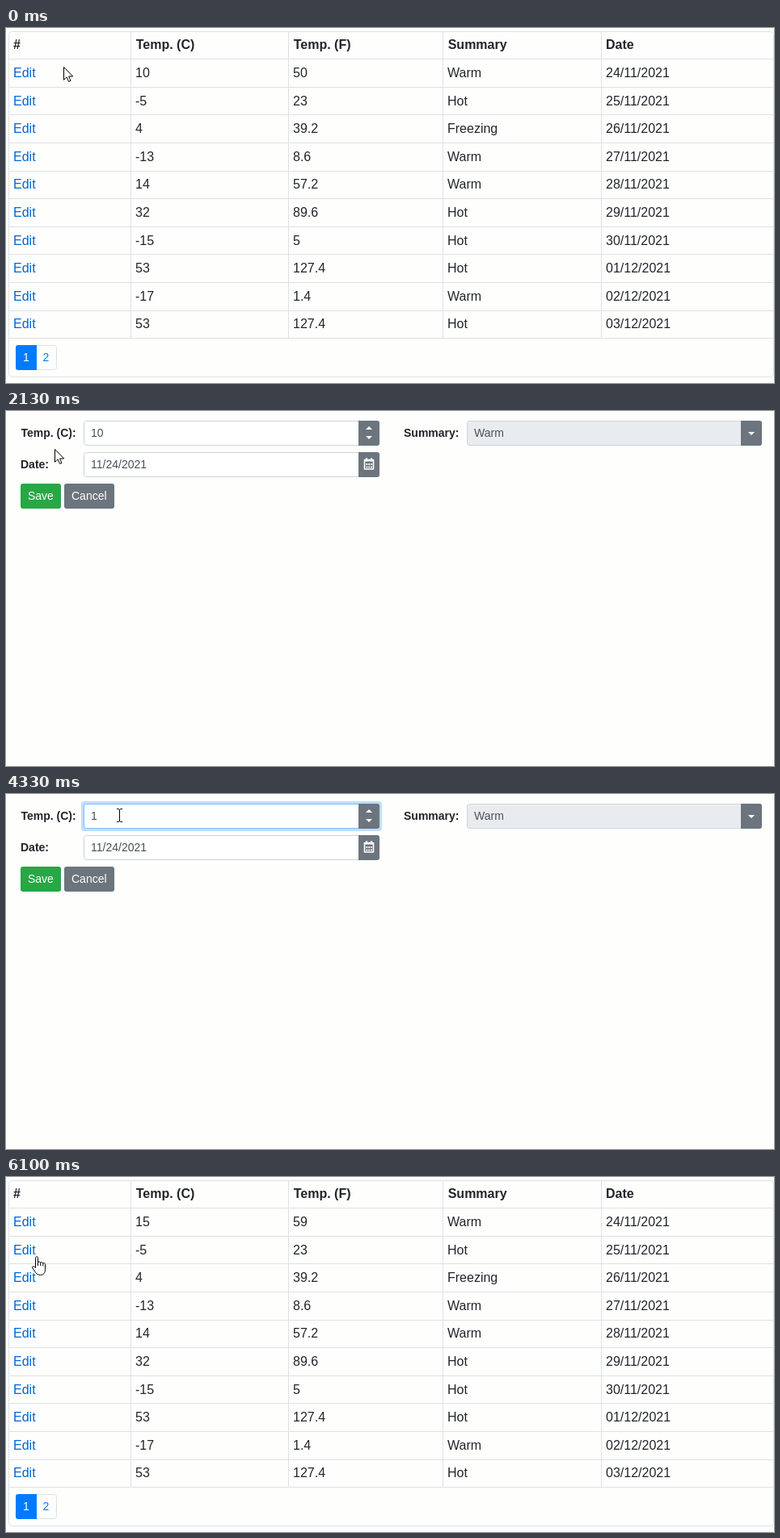
An HTML page that plays this animation: 950 by 440 pixels, repeating every 7630 ms.

```html
<!DOCTYPE html>
<html lang="en">
<head>
<meta charset="utf-8">
<title>Editable table</title>
<style>
  html, body { margin: 0; width: 100%; height: 100%; overflow: hidden; background: #fefefd; }
  svg { display: block; width: 100%; height: 100%; }
  text { font: 16px "Liberation Sans", Arial, sans-serif; fill: #212529; white-space: pre; }
  .bold { font-weight: 700; }
  .small { font-size: 14px; }
  .link { fill: #0366d6; }
  .link.over { fill: #0056b3; text-decoration: underline; }
  .value { fill: #495057; }
  .white { fill: #fff; }
</style>
</head>
<body>
<svg id="stage" viewBox="0 0 950 440" xmlns="http://www.w3.org/2000/svg"></svg>
<script>
const NS = 'http://www.w3.org/2000/svg';
const LOOP = 7630;
const GRID = '#dee2e6', GRAY = '#6c757d', FIELD = '#ced4da';
const stage = document.getElementById('stage');

function add(parent, tag, attrs = {}, content) {
  const el = document.createElementNS(NS, tag);
  for (const key in attrs) el.setAttribute(key, attrs[key]);
  if (content !== undefined) el.textContent = content;
  parent.appendChild(el);
  return el;
}
const group = parent => add(parent, 'g');
const label = (parent, x, y, str, cls = '') => add(parent, 'text', { x, y, class: cls }, str);
const path = (parent, d, attrs) => add(parent, 'path', { d, fill: 'none', ...attrs });
const box = (parent, x, y, width, height, attrs) =>
  add(parent, 'rect', { x, y, width, height, ...attrs });
const set = (el, attrs) => { for (const key in attrs) el.setAttribute(key, attrs[key]); };
const show = (el, on) => el.setAttribute('visibility', on ? 'visible' : 'hidden');

// Table
const table = group(stage);
const columns = [9, 160, 355, 546, 742];
const rows = [
  [10, 50, 'Warm'], [-5, 23, 'Hot'], [4, 39.2, 'Freezing'], [-13, 8.6, 'Warm'],
  [14, 57.2, 'Warm'], [32, 89.6, 'Hot'], [-15, 5, 'Hot'], [53, 127.4, 'Hot'],
  [-17, 1.4, 'Warm'], [53, 127.4, 'Hot']
];
box(table, 3.5, 4.5, 946, 428, { rx: 4, fill: 'none', stroke: GRID });
let grid = '';
for (let i = 0; i <= rows.length; i++) grid += `M4 ${Math.round(38.2 + 34.6 * i) + 0.5}H949`;
for (const x of [154.5, 349.5, 540.5, 736.5]) grid += `M${x} 5V384`;
path(table, grid, { stroke: GRID });
['#', 'Temp. (C)', 'Temp. (F)', 'Summary', 'Date'].forEach((str, i) =>
  label(table, columns[i] + (i && i < 4 ? 0.7 : 0), 26, str, 'bold'));

const cells = rows.map((row, i) => {
  const date = new Date(Date.UTC(2021, 10, 24 + i)).toISOString().slice(0, 10);
  const values = ['Edit', ...row, date.split('-').reverse().join('/')];
  const y = Math.round(61 + 34.6 * i);
  return values.map((v, c) => label(table, columns[c], y, v, c ? '' : 'link'));
});

path(table, 'M38 393.5H59.5a3 3 0 0 1 3 3V420.5a3 3 0 0 1 -3 3H38', { stroke: GRID });
path(table, 'M38 393H15a3 3 0 0 0 -3 3V421a3 3 0 0 0 3 3H38Z', { fill: '#007bff' });
label(table, 21, 413, '1', 'small white');
label(table, 45.5, 413, '2', 'small').style.fill = '#007bff';

// Edit form
const form = group(stage);
const glow = box(form, 96, 12, 366, 31, { rx: 4, fill: '#007bff' });

function field(x, y, w, fill) {
  const frame = box(form, x + 0.5, y + 0.5, w - 1, 30, { rx: 3, fill, stroke: FIELD });
  const r = x + w, l = r - 26;
  path(form, `M${l} ${y}H${r - 3}a3 3 0 0 1 3 3V${y + 28}a3 3 0 0 1 -3 3H${l}Z`, { fill: GRAY });
  return frame;
}
const tempFrame = field(96, 12, 366, '#fff');
field(96, 51, 366, '#fff');
field(570, 12, 365, '#e9ecef');
path(form, 'M445 23L449 19L453 23ZM445 31H453L449 35ZM918 26H926L922 30Z', { fill: '#fff' });

const icon = group(form);
path(icon, 'M443.5 60.5H454.5V72H443.5Z', { stroke: '#fff', 'stroke-width': 1.6, 'stroke-linejoin': 'round' });
path(icon, 'M443 61.5H455M446 58V61M452 58V61', { stroke: '#fff', 'stroke-width': 2 });
path(icon, 'M445.5 66H453M445.5 69.5H453', { stroke: '#fff', 'stroke-width': 1.8, 'stroke-dasharray': '1.8 1' });

label(form, 18.5, 32, 'Temp. (C):', 'small bold');
label(form, 18, 71, 'Date:', 'small bold');
label(form, 492, 32, 'Summary:', 'small bold');
const temp = label(form, 105, 32, '10', 'small value');
label(form, 105, 71, '11/24/2021', 'small value');
label(form, 579, 32, 'Warm', 'small value');
const caret = box(form, 120, 20, 1, 14, { fill: '#212529' });

const ring = box(form, 18, 90, 50, 31, { rx: 4, fill: '#48b461' });
const save = box(form, 18, 90, 50, 31, { rx: 3 });
box(form, 72, 90, 62, 31, { rx: 3, fill: GRAY });
label(form, 27, 110, 'Save', 'small white');
label(form, 81, 110, 'Cancel', 'small white');

// Pointers, each with its hot spot at 0,0
const ink = { stroke: '#000', 'stroke-linejoin': 'round' };
const pointers = { arrow: group(stage), hand: group(stage), beam: group(stage) };
path(pointers.arrow, 'M.5 .5V16.3L4.1 12.9L6.6 18.4L9 17.4L6.6 12H11.7Z', { ...ink, fill: '#fff' });
path(pointers.hand,
  'M-1.5 13.5V1.5C-1.5 -.9 1.5 -.9 1.5 1.5V6.8C2 5.4 4.5 5.6 4.7 7.4C5.3 6.2 7.6 6.5 7.8 8.3' +
  'C8.5 7.3 10.5 7.6 10.5 9.6V15.5C10.5 19.5 8.6 22.5 4.5 22.5C.8 22.5 -.8 20.5 -2.3 18' +
  'L-5.2 14C-6.2 12 -4 11 -2.6 12.4ZM1.5 6.8V11M4.7 7.4V11M7.8 8.3V11.5',
  { ...ink, fill: '#fff' });
path(pointers.beam, 'M-3 -7.5H-1L.5 -6.5L2 -7.5H4M.5 -6.5V7M-3 8.5H-1L.5 7.5L2 8.5H4M.5 7V8', ink);

const clamp = v => Math.min(1, Math.max(0, v));
const ramp = (t, from, span) => {
  const u = clamp((t - from) / span);
  return u * u * (3 - 2 * u);
};
const mix = (a, b, p) => `rgb(${a.map((v, i) => Math.round(v + (b[i] - v) * p))})`;

// start, duration, from, to, bend of the path
const moves = [
  [345, 715, [71, 48], [30, 55], [0, 10]],
  [1905, 655, [30, 55], [140, 26], [0, 0]],
  [4980, 580, [140, 26], [38, 99], [10, 4]]
];
function pointerAt(t) {
  const [start, span, a, b, bend] = moves.filter(m => t >= m[0]).pop() || moves[0];
  const s = ramp(t, start, span);
  return a.map((v, i) => v + (b[i] - v) * s + 2 * s * (1 - s) * bend[i]);
}

const OPEN = 1730, FORM = 1760, LEAVE = 6070, DONE = 6100;
const inside = ([x, y], l, top, r, bottom) => x >= l && x <= r && y >= top && y <= bottom;
const within = (t, a, b) => t >= a && t < b;

function pointerKind(t, p) {
  if (t < FORM) return inside(p, 9, 48, 37, 66) ? 'hand' : 'arrow';
  if (t < 1930 || t >= LEAVE) return 'hand';
  if (inside(p, 18, 90, 68, 121)) return 'hand';
  return inside(p, 96, 12, 436, 43) || inside(p, 96, 51, 436, 82) ? 'beam' : 'arrow';
}

function draw(t) {
  const editing = within(t, FORM, LEAVE);
  const p = pointerAt(t);
  const kind = pointerKind(t, p);

  table.style.display = t < OPEN || t >= DONE ? '' : 'none';
  form.style.display = editing ? '' : 'none';

  const saved = t >= DONE;
  cells[0][1].textContent = saved ? 15 : 10;
  cells[0][2].textContent = saved ? 59 : 50;
  cells[0][0].setAttribute('class', t < OPEN && kind === 'hand' ? 'link over' : 'link');

  const focus = ramp(t, 2700, 160) * (1 - ramp(t, 5890, 150));
  const g = 3 * focus;
  set(glow, { x: 96 - g, y: 12 - g, width: 366 + 2 * g, height: 31 + 2 * g, opacity: 0.25 * focus });
  tempFrame.setAttribute('stroke', mix([206, 212, 218], [128, 189, 255], focus));

  const value = t < 3700 ? '10' : t < 4430 ? '1' : '15';
  temp.textContent = value;
  caret.setAttribute('x', value.length === 1 ? 113 : 120);
  const lit = within(t, 2700, 3260) || within(t, 3760, 4330) || within(t, 4430, 5000) || within(t, 5530, 5900);
  caret.setAttribute('opacity', lit ? 1 : 0);

  save.setAttribute('fill', mix([40, 167, 69], [33, 136, 56], ramp(t, 5410, 150)));
  const press = ramp(t, 5890, 150), w = 3 * press;
  set(ring, { x: 18 - w, y: 90 - w, width: 50 + 2 * w, height: 31 + 2 * w, opacity: 0.5 * press });

  for (const name in pointers) {
    show(pointers[name], name === kind);
    pointers[name].setAttribute('transform', `translate(${Math.round(p[0])} ${Math.round(p[1])})`);
  }
}

const begin = performance.now();
function tick() {
  draw((performance.now() - begin) % LOOP);
  requestAnimationFrame(tick);
}
tick();
</script>
</body>
</html>
```
